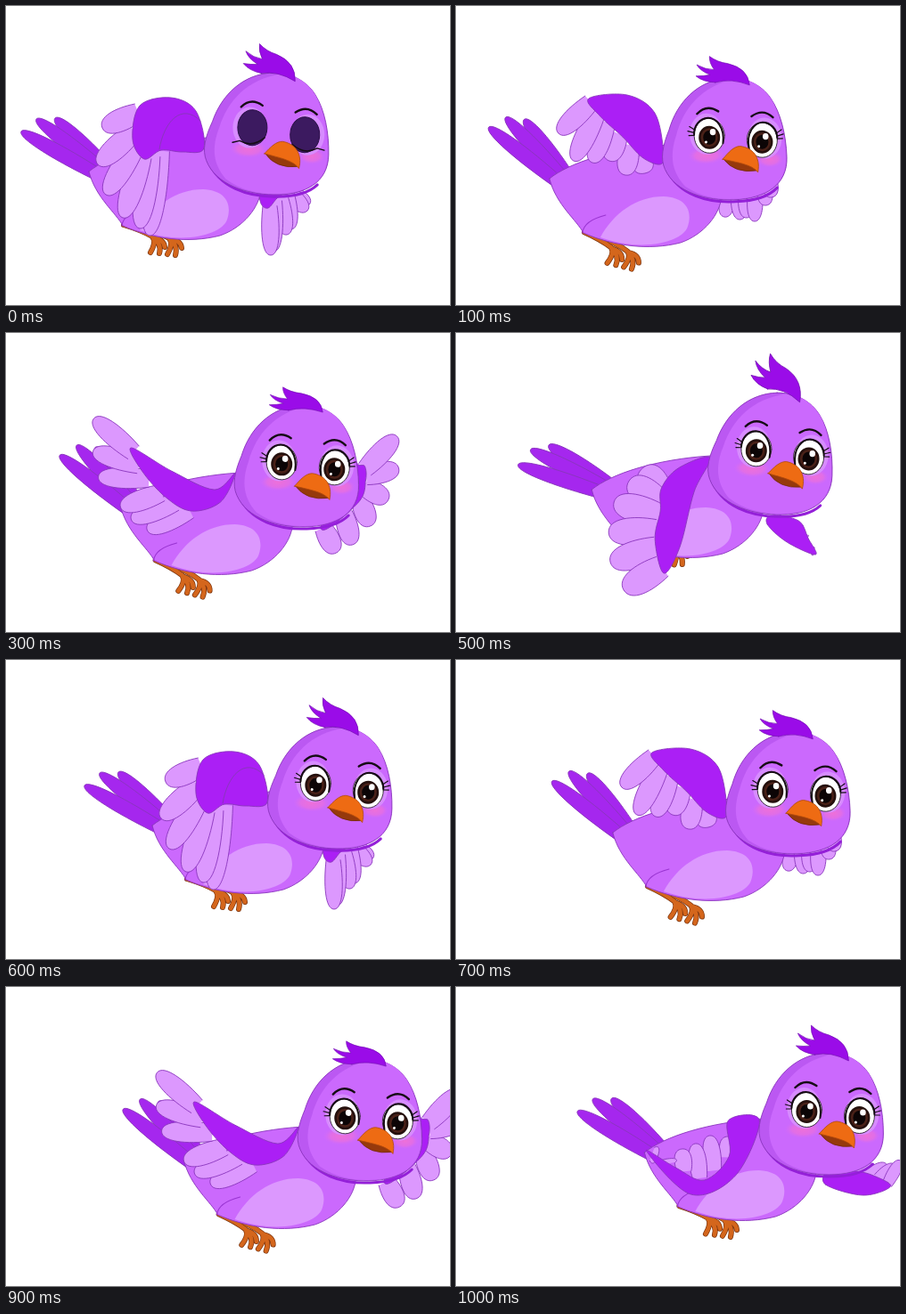
Write an HTML page with a canvas that moves like this. It is 498x336 px and loops after 1050 ms.

```html
<!DOCTYPE html>
<html lang="en">
<head>
<meta charset="utf-8">
<title>Flying bird</title>
<style>
  html, body { margin: 0; width: 100%; height: 100%; overflow: hidden; background: #fff; }
  canvas { display: block; width: 498px; height: 336px; }
</style>
</head>
<body>
<canvas id="stage" width="498" height="336"></canvas>
<script>
const ctx = document.getElementById('stage').getContext('2d');
const STEP = 50, STEPS = 21, FLAP = 12, DRIFT = 5.92;
const COL = {
  body: '#cb69fd', shade: '#bb58f2', pale: '#dc98fe', dark: '#ab1ff5', tail: '#a527ee',
  line: '#8a36bd', orange: '#ee6b13', mouth: '#96390c', leg: '#d4661c', ink: '#160c14'
};

// Each table holds six poses of one wing beat, two steps apart.
const bodyY = [[0], [8], [18], [9], [0], [-10]];
const swing = [[0], [9], [18], [9], [1], [-11]];
const headPose = [[1, 1], [7, -2], [13, -5], [7, -1], [0, 0], [-7, 2]];
const crestPose = [[1, 2], [.9, -3], [.62, -6], [.8, -4], [1, 0], [1.2, 8]];
const featherWidth = [[26, 20], [24, 18], [30, 28], [24, 24], [20, 14], [32, 10]];

const nearBand = [
  [222,160, 213,118, 185,103, 150,112, 142,150, 155,172, 174,162, 198,164],
  [221,165, 211,120, 180,100, 137,104, 150,124, 175,147, 197,170, 217,178],
  [217,165, 176,130, 156,85, 131,60, 116,80, 132,130, 165,172, 193,187],
  [221,158, 198,176, 150,155, 105,129, 117,155, 143,184, 172,200, 205,190],
  [222,150, 195,212, 145,233, 95,184, 128,203, 160,217, 188,190, 187,150],
  [226,140, 208,178, 192,240, 174,270, 164,232, 170,200, 171,175, 190,152]
];
const nearTips = [
  [108,137, 103,178, 112,212, 131,238, 150,250, 161,258],
  [103,143, 120,174, 141,176, 160,174, 178,190, 200,188],
  [66,24, 67,68, 84,117, 103,152, 122,180, 150,205],
  [63,96, 62,133, 68,162, 93,196, 105,210, 123,222],
  [108,190, 119,193, 135,182, 150,176, 166,167, 187,168],
  [129,289, 114,258, 112,224, 118,190, 135,166, 150,152]
];
const farBand = [
  [285,205, 286,222, 294,227, 304,216, 316,206, 300,200],
  [330,180, 338,185, 342,190, 330,200, 310,205, 295,205],
  [340,130, 365,112, 385,107, 388,125, 375,155, 340,195],
  [345,140, 360,148, 367,150, 368,165, 360,190, 318,220],
  [296,222, 338,234, 369,224, 350,212, 330,207, 300,206],
  [290,215, 312,235, 344,249, 336,231, 325,211, 295,205]
];
const farTips = [
  [297,280, 300,276, 315,257, 320,251, 338,230, 341,222],
  [342,215, 336,224, 323,242, 314,238, 307,240, 289,237],
  [451,93, 435,134, 410,176, 381,207, 358,230, 325,240],
  [403,116, 405,152, 393,188, 373,217, 353,238, 335,247],
  [380,195, 374,200, 365,200, 352,202, 343,206, 335,206],
  [340,245, 335,237, 330,229, 322,221, 314,215, 308,212]
];

const head = new Path2D('M296 74C264 76 240 99 230 130C222 148 219 162 224 174C235 201 270 211 300 211C336 211 361 196 361 165C361 140 356 115 345 98C335 82 316 73 296 74Z');
const face = new Path2D('M306 75C268 82 247 106 238 136C229 160 232 178 246 194C264 207 283 210 300 210C336 210 360 196 360 165C360 140 355 115 345 98C336 84 322 75 306 75Z');
const chin = new Path2D('M226 174C238 204 272 214 302 213C324 213 340 208 349 199');
const body = new Path2D('M93 186C115 168 165 152 226 148L286 205C285 226 266 249 240 258C205 267 165 262 131 247C124 233 100 215 93 186Z');
const belly = new Path2D('M150 252C165 225 190 206 221 206C246 207 254 222 248 240C243 256 200 270 150 252Z');
const thigh = new Path2D('M130 247C131 237 140 231 156 227');
const crest = new Path2D('M284 76Q270 74 263 66Q272 67 279 66Q268 60 265 52Q274 59 284 60Q279 51 280 43Q288 51 300 54Q322 62 322 83Q302 72 284 76Z');
const beak = new Path2D('M289 165C296 157 302 151 309 151C323 153 332 164 328 181C322 172 305 169 289 165Z');
const jaw = new Path2D('M290 165Q302 182 327 179Q318 166 290 165Z');
const leg = new Path2D('M132 246Q152 252 164 259Q169 265 162 277M165 260Q175 268 172 278M165 260Q177 262 178 271');
const leg2 = new Path2D('M140 247Q168 252 183 261Q188 267 181 279M184 262Q193 269 190 280M184 262Q196 263 197 272');
const arch = new Path2D('M172 161C177 130 197 108 218 129');

// Cyclic cubic interpolation through a pose table.
function at(table, phase) {
  const p = phase / 2, i = Math.floor(p), f = p - i, n = table.length;
  const [a, b, c, d] = [-1, 0, 1, 2].map(k => table[(i + k + n) % n]);
  return b.map((v, k) => v + f / 2 * (c[k] - a[k] +
    f * (2 * a[k] - 5 * v + 4 * c[k] - d[k] + f * (3 * (v - c[k]) + d[k] - a[k]))));
}

function points(flat) {
  const out = [];
  for (let i = 0; i < flat.length; i += 2) out.push([flat[i], flat[i + 1]]);
  return out;
}

function paint(path, fill, line, width = .9) {
  if (fill) { ctx.fillStyle = fill; ctx.fill(path); }
  if (line) { ctx.strokeStyle = line; ctx.lineWidth = width; ctx.stroke(path); }
}

function oval(x, y, rx, ry, fill, line, width) {
  const path = new Path2D();
  path.ellipse(x, y, rx, ry, 0, 0, 7);
  paint(path, fill, line, width);
}

function group(x, y, angle, px, py, draw, sy = 1) {
  ctx.save();
  ctx.translate(x + px, y + py);
  ctx.rotate(angle * Math.PI / 180);
  ctx.scale(1, sy);
  ctx.translate(-px, -py);
  draw();
  ctx.restore();
}

function feather([x, y], [tx, ty], w, fill) {
  const dx = tx - x, dy = ty - y, len = Math.hypot(dx, dy) || 1;
  const nx = -dy / len * w, ny = dx / len * w;
  const spot = (f, s) => [x + dx * f + nx * s, y + dy * f + ny * s];
  const path = new Path2D();
  path.moveTo(...spot(0, .4));
  path.bezierCurveTo(...spot(.5, .58), ...spot(1, .5), tx, ty);
  path.bezierCurveTo(...spot(1, -.5), ...spot(.5, -.58), ...spot(0, -.4));
  paint(path, fill, COL.line);
}

function smooth(pts) {
  const n = pts.length, path = new Path2D();
  path.moveTo(...pts[0]);
  pts.forEach((p, i) => {
    const a = pts[(i + n - 1) % n], q = pts[(i + 1) % n], d = pts[(i + 2) % n];
    path.bezierCurveTo(p[0] + (q[0] - a[0]) / 6, p[1] + (q[1] - a[1]) / 6,
      q[0] - (d[0] - p[0]) / 6, q[1] - (d[1] - p[1]) / 6, ...q);
  });
  path.closePath();
  return path;
}

// Feathers grow from the trailing edge, which starts at the band's tip point.
function wing(band, tips, tip, width) {
  const edge = points(band);
  points(tips).map((t, k) => [t, .2 + k * .55]).reverse().forEach(([t, s]) => {
    const i = tip + Math.floor(s), f = s % 1;
    const a = edge[i], b = edge[Math.min(i + 1, edge.length - 1)];
    feather([a[0] + (b[0] - a[0]) * f, a[1] + (b[1] - a[1]) * f], t, width, COL.pale);
  });
  paint(smooth(edge), COL.dark, COL.line);
}

function limb(path) {
  paint(path, null, '#7c3510', 6);
  paint(path, null, COL.leg, 4.6);
}

function cheek(x, y, rx, ry) {
  ctx.save();
  ctx.translate(x, y);
  ctx.scale(rx, ry);
  const glow = ctx.createRadialGradient(0, 0, 0, 0, 0, 1);
  glow.addColorStop(0, '#ee70d8');
  glow.addColorStop(.6, '#e96fdfbb');
  glow.addColorStop(1, '#d56df500');
  oval(0, 0, 1, 1, glow);
  ctx.restore();
}

function eye(x, y, side, shut) {
  const curve = d => {
    const path = new Path2D(d);
    ctx.save();
    ctx.translate(x, y);
    ctx.scale(side, 1);
    return { draw(w) { paint(path, null, COL.ink, w); ctx.restore(); } };
  };
  oval(x + 3 * side, y - 2, 19, 23, '#d78cff');
  if (shut) {
    oval(x, y - 2, 16.5, 20, '#3c1a60', '#2a1046', 1);
    curve('M-14 9Q0 21 14 13L22 15').draw(1.4);
  } else {
    oval(x, y, 17, 19.5, '#fff', COL.ink, .8);
    oval(x, y + 2, 12, 13, '#25100d');
    oval(x, y + 2, 9.5, 10.5, '#4a2118');
    oval(x, y + 2, 7, 8, '#0c0506');
    oval(x + 4, y - 4, 3.3, 3.6, '#fff');
    oval(x - 4, y + 7, 1.5, 1.5, '#fff');
    curve('M-15 9C-18 -9 -8 -20 1 -20C10 -20 17 -12 17 -2').draw(2);
    curve('M16 -7L22 -11M17 -4L24 -6M17 -1L23 -1').draw(1.2);
  }
  curve('M-11 -27Q2 -36 13 -25').draw(2.4);
}

function drawHead(phase, shut) {
  paint(chin, null, '#9420d8', 3);
  const [stretch, tilt] = at(crestPose, phase);
  paint(head, COL.shade, COL.line);
  paint(face, COL.body);
  group(0, 0, tilt, 318, 82, () => paint(crest, '#9a0ce8', '#7410b2', .7), stretch);
  cheek(271, 160, 21, 10);
  cheek(342, 167, 15, 9);
  eye(275, 138, -1, shut);
  eye(334, 145, 1, shut);
  paint(jaw, COL.mouth, '#6f2808', .7);
  paint(beak, COL.orange, '#b24a0c', .8);
}

function draw(step) {
  const phase = step % FLAP;
  const [y] = at(bodyY, phase), [turn] = at(swing, phase);
  const [hy, nod] = at(headPose, phase);
  const [nearW, farW] = at(featherWidth, phase);

  ctx.setTransform(1, 0, 0, 1, 0, 0);
  ctx.fillStyle = '#fff';
  ctx.fillRect(0, 0, 498, 336);
  ctx.translate(DRIFT * step, 0);
  ctx.lineCap = ctx.lineJoin = 'round';

  group(0, y, turn, 102, 184, () => {
    feather([112, 180], [55, 126], 17, COL.tail);
    feather([108, 184], [34, 127], 17, COL.tail);
    feather([104, 190], [17, 141], 17, COL.tail);
  });
  wing(at(farBand, phase), at(farTips, phase), 2, farW);
  group(0, y, turn * .85, 131, 247, () => { limb(leg2); limb(leg); });
  group(0, y, 0, 0, 0, () => {
    paint(body, COL.body, COL.line);
    ctx.save();
    ctx.clip(body);
    paint(belly, COL.pale);
    ctx.restore();
    paint(thigh, null, '#9a35d2', 1.2);
  });
  wing(at(nearBand, phase), at(nearTips, phase), 3, nearW);
  if (phase === 0) paint(arch, null, COL.line, 1);
  group(0, hy, nod, 295, 215, () => drawHead(phase, step < 2));
}

const start = performance.now();
let shown = -1;
function tick() {
  const step = Math.floor((performance.now() - start) / STEP) % STEPS;
  if (step !== shown) draw(shown = step);
  requestAnimationFrame(tick);
}
tick();
</script>
</body>
</html>
```
